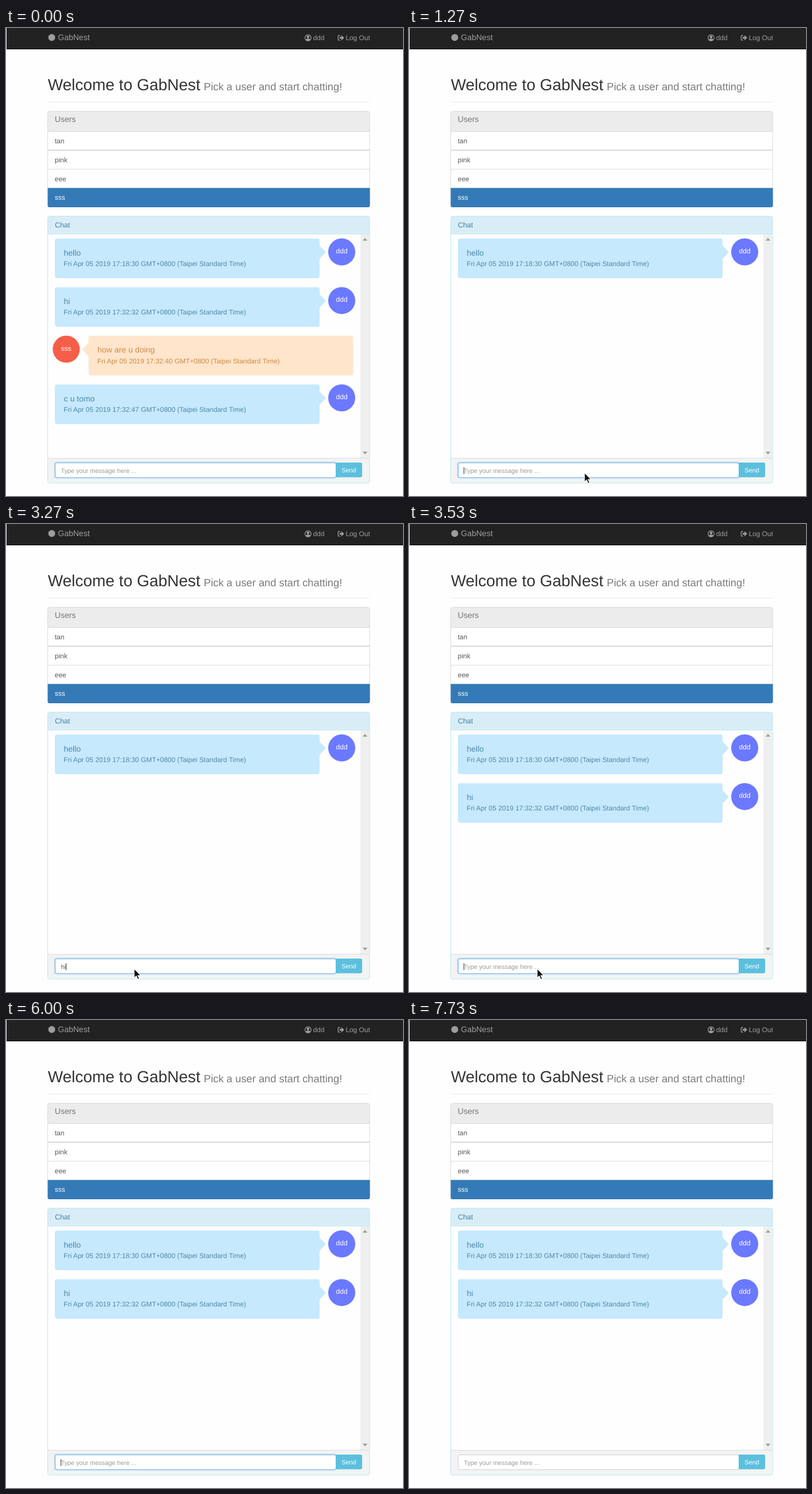
Recreate the animation shown at these times as an HTML page. Size 690 by 812 pixels, loop 8 s.

```html
<!DOCTYPE html>
<html lang="en">
<head>
<meta charset="utf-8">
<title>GabNest</title>
<style>
  html, body { margin: 0; width: 100%; height: 100%; overflow: hidden; background: #fefefe; }
  svg { display: block; width: 690px; height: 812px; }
  text {
    font-family: "Liberation Sans", Arial, sans-serif;
    white-space: pre;
    text-rendering: geometricPrecision;
  }
</style>
</head>
<body>
<svg id="stage" viewBox="0 0 690 812" xmlns="http://www.w3.org/2000/svg"></svg>
<script>
const NS = "http://www.w3.org/2000/svg";
const LOOP = 8000;
const APP = "GabNest", ME = "ddd", PEER = "sss";
const stage = document.getElementById("stage");

function add(tag, attrs, parent = stage) {
  const el = document.createElementNS(NS, tag);
  for (const k in attrs) el.setAttribute(k, attrs[k]);
  parent.appendChild(el);
  return el;
}
const box = (x, y, width, height, fill, more = {}, parent) =>
  add("rect", { x, y, width, height, fill, ...more }, parent);
const path = (d, fill, more = {}, parent) => add("path", { d, fill, ...more }, parent);
function label(str, x, y, size, fill, parent) {
  const el = add("text", { x, y, "font-size": size, fill }, parent);
  el.textContent = str;
  return el;
}
const show = (el, on) => el.setAttribute("visibility", on ? "visible" : "hidden");

function drawNav() {
  const grey = "#9d9d9d";
  box(1, 0, 689, 36, "#222");
  box(1, 36, 689, 1, "#0a0a0a");
  add("circle", { cx: 79.5, cy: 16.5, r: 6, fill: grey });
  label(APP, 90.3, 21, 14, grey);

  add("circle", { cx: 525, cy: 17, r: 5.3, fill: "none", stroke: grey, "stroke-width": 1.2 });
  add("circle", { cx: 525, cy: 15.4, r: 2.3, fill: grey });
  path("M520.8 20.3Q522 18 525 18.2Q528 18 529.2 20.3Q527.6 22.4 525 22.4Q522.4 22.4 520.8 20.3Z", grey);
  label(ME, 533.7, 21, 11.9, grey);

  path("M580.5 13H578.6Q577.3 13 577.3 14.3V19.7Q577.3 21 578.6 21H580.5", "none",
    { stroke: grey, "stroke-width": 1.3 });
  path("M579.8 15.4H583V12.6L587.8 17L583 21.4V18.6H579.8Z", grey);
  label("Log Out", 590.4, 21, 11.9, grey);
}

function drawUsers() {
  label("Welcome to " + APP, 72.7, 108, 27.95, "#333");
  label("Pick a user and start chatting!", 343.8, 108, 18.25, "#7a7a7a");
  box(73, 128, 559, 1, "#ebebeb");

  const line = "#dadada";
  box(73, 145, 559, 165, "#fff", { rx: 3 });
  path("M73 179V148Q73 145 76 145H629Q632 145 632 148V179Z", "#ececec");
  box(72.5, 144.5, 559.5, 166, "none", { rx: 3, stroke: line });
  box(73, 179, 559, 1, line);
  box(73, 211, 559, 2, line);
  box(73, 244.5, 559, 1, line);
  path("M72.5 277.5H632.5V308Q632.5 311 629.5 311H75.5Q72.5 311 72.5 308Z", "#337ab7");
  label("Users", 84.8, 163, 14, "#777");
  ["tan", "pink", "eee", PEER].forEach((name, i) =>
    label(name, 84.8, 199.7 + 32.9 * i, 11.9, i === 3 ? "#fff" : "#555"));
}

function drawChat() {
  const edge = "#bce8f1";
  box(73, 327, 559, 462, "#fefefe", { rx: 3 });
  path("M73 357V330Q73 327 76 327H629Q632 327 632 330V357Z", "#d9edf7");
  path("M73 746H632V786Q632 789 629 789H76Q73 789 73 786Z", "#f3f3f3");
  box(73, 357, 559, 1, edge);
  box(73, 746, 559, 1, "#dcdcdc");
  box(616, 358, 15.5, 388, "#efefef");
  path("M619.8 369L624 364L628.2 369Z", "#a0a0a0");
  path("M619.8 735L624 740L628.2 735Z", "#a0a0a0");
  box(72.5, 326.5, 559.5, 463, "none", { rx: 3, stroke: edge });
  label("Chat", 84.9, 346.3, 12.5, "#44809f");
}

function addMessage(row, str, clock, mine) {
  const g = add("g", { transform: `translate(0 ${365 + 84.4 * row})` });
  const fill = mine ? "#c7e9fd" : "#ffe5cb";
  const ink = mine ? "#4c88ab" : "#cd8a45";
  const left = mine ? 85 : 143.5;
  box(left, 0.3, 460, 68.7, fill, { rx: 4 }, g);
  path(mine ? "M544.5 12L556 24L544.5 36Z" : "M144 12L132.5 24L144 36Z", fill, {}, g);
  add("circle", { cx: mine ? 583.5 : 104.7, cy: 23.5, r: 23.5, fill: mine ? "#6b79ff" : "#f65e49" }, g);
  label(mine ? ME : PEER, mine ? 573.6 : 95.6, 25.8, 12, "#fff", g);
  label(str, left + 15.5, 29.5, 14, ink, g);
  label(`Fri Apr 05 2019 ${clock} GMT+0800 (Taipei Standard Time)`, left + 15.3, 48, 11.9, ink, g);
  return g;
}

drawNav();
drawUsers();
drawChat();
addMessage(0, "hello", "17:18:30", true);
const hi = addMessage(1, "hi", "17:32:32", true);
const reply = addMessage(2, "how are u doing", "17:32:40", false);
const bye = addMessage(3, "c u tomo", "17:32:47", true);

// Message field
const glow = add("g", {});
[[6, 0.06], [4, 0.1], [2, 0.16]].forEach(([w, o]) =>
  box(85 - w / 2, 754 - w / 2, 488 + w, 26 + w, "#66afe9", { rx: 3 + w / 2, opacity: o }, glow));
const field = box(85.5, 754.5, 488, 25.5, "#fff", { rx: 3 });
const hint = label("Type your message here ...", 95.4, 771.7, 10.85, "#999");
const typed = label("hi", 95.4, 771.7, 10.85, "#555");
const caret = box(95, 762, 1, 12, "#333");
path("M573 754H616Q619 754 619 757V776.5Q619 779.5 616 779.5H573Z", "#5bc0de");
label("Send", 583.3, 770.8, 10.8, "#fff");

const arrow = path("M0 0V16.2L3.7 12.7L6.3 18.6L9 17.4L6.4 11.7H11.4Z", "#111",
  { stroke: "#fff", "stroke-width": 1.1, "stroke-linejoin": "round" });

// Pointer places as [time, x, y]
const moves = [[530, 387, 473], [730, 340, 682], [1000, 231, 754], [1270, 305, 771.5], [1530, 222.8, 771.5]];
const blinks = [[270, 730], [1270, 1730], [2270, 3000], [3270, 4000], [5000, 5270], [6000, 6730]];
const within = (t, a, b) => t >= a && t < b;

function render(t) {
  const start = t < 270;
  const sent = start || t >= 3530;
  const typing = within(t, 3270, 3530);
  const focus = t < 7000;

  show(hi, sent);
  show(reply, start);
  show(bye, start);

  show(typed, typing);
  show(hint, !typing);
  show(caret, blinks.some(([a, b]) => within(t, a, b)));
  caret.setAttribute("x", typing ? 104 : 95);
  show(glow, focus);
  field.setAttribute("stroke", focus ? "#66afe9" : "#cdcdcd");

  show(arrow, within(t, 530, 4530));
  const place = moves.filter(m => m[0] <= t).pop() || moves[0];
  arrow.setAttribute("transform", `translate(${place[1]} ${place[2]})`);
}

function tick() {
  render(performance.now() % LOOP);
  requestAnimationFrame(tick);
}
tick();
</script>
</body>
</html>
```
